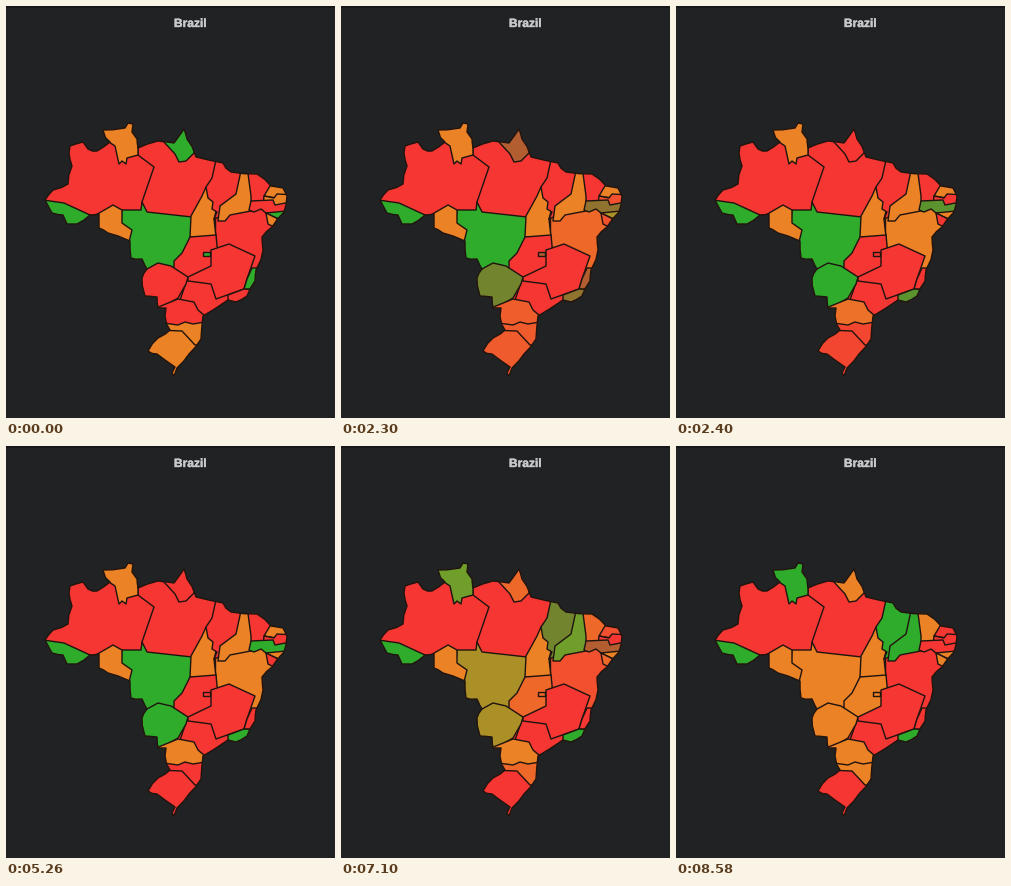
Recreate the animation shown at these times as a matplotlib script. Size 329 by 412 pixels, loop 9500 ms.

```python
import matplotlib.pyplot as plt
import numpy as np
from matplotlib.animation import FuncAnimation
from matplotlib.patches import Polygon, Rectangle
from matplotlib.patheffects import withStroke

W, H, DPI = 329, 412, 100
STEP_MS, FRAMES = 100, 95
PX = 72 / DPI

BACK, STRIP, BORDER, TITLE = "#212224", "#161719", "#20140e", "#c8c9cc"
LEVELS = {
    "R": np.array([245, 54, 51]) / 255,
    "O": np.array([235, 130, 38]) / 255,
    "G": np.array([48, 172, 44]) / 255,
}
SECOND_MS, THIRD_MS = 2200, 7000
EARLY = {"AP", "MS", "BA", "ES", "AL", "SE", "PB", "DF"}

NORTH_COAST = [
    (39, 194), (47, 184), (62, 178), (66, 160), (63, 147), (64, 140), (77, 136), (82, 143),
    (91, 145), (104, 136), (97, 124), (119, 122), (122, 117), (127, 118), (126, 126),
    (131, 133), (132, 142), (152, 135), (168, 137), (178, 123), (181, 133), (190, 151),
    (217, 157), (225, 166), (251, 168), (265, 180), (277, 182), (281, 190), (278, 206)]
SOUTH_COAST = [
    (266, 221), (256, 231), (257, 244), (250, 264), (249, 275), (241, 290), (230, 296),
    (222, 294), (197, 310), (195, 333), (183, 348), (171, 362), (168, 370), (166, 367),
    (169, 361), (151, 348), (142, 345), (152, 332), (164, 324), (159, 310), (160, 302),
    (152, 302), (151, 291), (139, 290), (136, 272), (141, 263), (136, 253), (125, 252),
    (124, 235), (102, 227), (93, 222), (93, 208), (84, 209), (71, 218), (61, 218),
    (57, 209), (46, 207)]

# Painted in order and clipped to the coast: each state covers the loose sides of
# those before it, so every inland border is given once. Letters are its levels.
STATES = {
    "AM": ("RRR", [(0, 0), (W, 0), (W, H), (0, H)]),
    "PA": ("RRR", [(132, 110), (132, 149), (148, 161), (136, 196), (136, 215), (190, 215),
                   (215, 170), (215, 110)]),
    "MT": ("GGO", [(116, 204), (135, 204), (136, 196), (141, 206), (186, 211), (186, 270),
                   (110, 270)]),
    "RO": ("OOO", [(88, 210), (107, 199), (116, 204), (116, 217), (126, 224), (122, 240),
                   (88, 240)]),
    "AC": ("GGG", [(30, 193), (58, 197), (84, 209), (84, 225), (30, 225)]),
    "RR": ("OOG", [(103, 136), (109, 140), (113, 158), (116, 155), (120, 158), (121, 152),
                   (132, 149), (132, 110), (90, 110), (90, 136)]),
    "AP": ("GRO", [(158, 120), (158, 136), (169, 148), (173, 156), (180, 155), (188, 147),
                   (195, 120)]),
    "BA": ("ROR", [(209, 200), (300, 200), (300, 266), (209, 266)]),
    "TO": ("OOO", [(200, 181), (214, 190), (208, 213), (210, 231), (184, 231), (185, 210),
                   (196, 190)]),
    "MA": ("RRG", [(200, 181), (202, 192), (207, 196), (206, 203), (211, 206), (208, 213),
                   (240, 200), (240, 145), (212, 145), (206, 172)]),
    "PI": ("OOG", [(236, 160), (230, 188), (214, 200), (212, 215), (219, 215), (224, 209),
                   (250, 204), (250, 160)]),
    "CE": ("RRO", [(241, 160), (245, 190), (245, 200), (262, 200), (275, 160)]),
    "RN": ("OOR", [(267, 175), (258, 190), (290, 195), (290, 175)]),
    "PB": ("ORR", [(258, 190), (268, 192), (271, 188), (290, 189), (290, 205), (257, 200)]),
    "PE": ("RGR", [(245, 195), (267, 194), (269, 199), (290, 195), (290, 205), (271, 207),
                   (260, 207), (255, 203), (248, 206), (243, 204)]),
    "AL": ("GOO", [(260, 207), (290, 204), (280, 216), (266, 210)]),
    "SE": ("ORO", [(260, 207), (276, 215), (270, 222), (262, 218)]),
    "GO": ("RRO", [(184, 231), (210, 229), (215, 280), (175, 280), (168, 264), (168, 255),
                   (176, 247)]),
    "SP": ("RRR", [(182, 271), (210, 271), (230, 288), (225, 320), (165, 320)]),
    "MS": ("RGO", [(141, 263), (152, 257), (165, 260), (182, 271), (180, 278), (172, 292),
                   (160, 299), (160, 310), (130, 310), (130, 263)]),
    "MG": ("RRR", [(205, 244), (223, 238), (249, 250), (241, 273), (238, 283), (210, 293),
                   (205, 278), (182, 275), (182, 271), (205, 260)]),
    "DF": ("GRO", [(197, 246), (204, 246), (204, 250), (197, 250)]),
    "ES": ("GRR", [(246, 262), (265, 262), (255, 284), (238, 283), (241, 273)]),
    "RJ": ("RGG", [(238, 283), (255, 284), (250, 305), (222, 300), (222, 289)]),
    "RS": ("ORR", [(140, 318), (210, 318), (210, 380), (140, 380)]),
    "SC": ("ORO", [(150, 310), (205, 310), (205, 339), (189, 339), (176, 325), (150, 324)]),
    "PR": ("ROO", [(150, 302), (172, 293), (188, 296), (192, 304), (205, 315), (187, 318),
                   (179, 316), (172, 319), (150, 316)]),
}


def roughen(points, size=0.7, seed=4):
    """Split each long side at its middle and nudge the new point."""
    rng = np.random.default_rng(seed)
    points = np.array(points, float)
    result = []
    for start, end in zip(points, np.roll(points, -1, axis=0)):
        result.append(start)
        if np.hypot(*(end - start)) > 9:
            result.append((start + end) / 2 + rng.normal(0, size, 2))
    return result


def ease(ms, length):
    return np.clip(ms / length, 0, 1) ** 0.6


def color_at(name, ms):
    first, second, third = (LEVELS[letter] for letter in STATES[name][0])
    to_second = ease(ms - SECOND_MS, 200 if name in EARLY else 300)
    color = first + (second - first) * to_second
    return color + (third - color) * ease(ms - THIRD_MS, 200)


fig = plt.figure(figsize=(W / DPI, H / DPI), dpi=DPI, facecolor=BACK)
ax = fig.add_axes([0, 0, 1, 1])
ax.set(xlim=(0, W), ylim=(H, 0))
ax.axis("off")
ax.add_patch(Rectangle((0, 0), W, 2, color=STRIP, lw=0))
ax.text(184.5, 21, "Brazil", ha="center", va="baseline", color=TITLE,
        family="Liberation Sans", weight="bold", size=12 * PX,
        path_effects=[withStroke(linewidth=0.4 * PX, foreground=TITLE)])

line = dict(ec=BORDER, lw=1.4 * PX, joinstyle="round")
coast = ax.add_patch(Polygon(roughen(NORTH_COAST + SOUTH_COAST), fill=False, zorder=4, **line))
patches = {}
for order, (name, (_, points)) in enumerate(STATES.items()):
    patches[name] = ax.add_patch(Polygon(points, zorder=2 + order / 100, **line))
    patches[name].set_clip_path(coast)


def draw(frame):
    for name, patch in patches.items():
        patch.set_facecolor(color_at(name, frame * STEP_MS))
    return list(patches.values())


anim = FuncAnimation(fig, draw, frames=FRAMES, interval=STEP_MS, repeat=True, repeat_delay=0)
plt.show()
```
